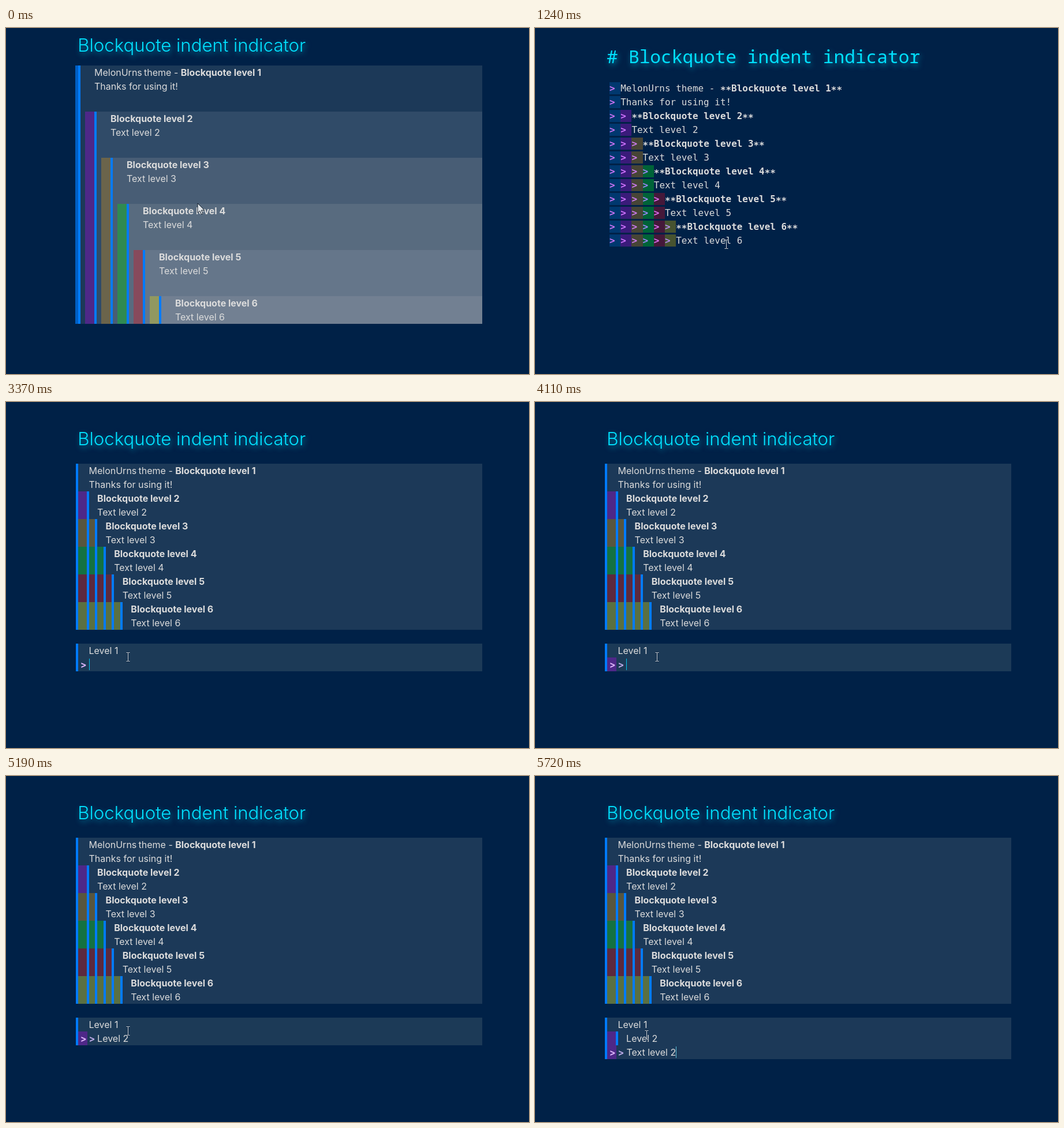
Recreate the animation shown at these times as an HTML page. Size 906x600 px, loop 6030 ms.

```html
<!DOCTYPE html>
<html lang="en">
<head>
<meta charset="utf-8">
<title>Blockquote indent indicator</title>
<style>
  html, body { margin: 0; width: 100%; height: 100%; overflow: hidden; background: #002147; }
  svg { display: block; width: 906px; height: 600px; }
  text { font: 400 16px Inter, sans-serif; fill: #dcdcdc; white-space: pre; font-optical-sizing: none; }
  .b { font-weight: 700; }
  .m { font-family: "DejaVu Sans Mono", monospace; font-size: 15.95px; }
  .h { font-size: 31.2px; font-weight: 300; fill: #00e1ff; text-shadow: 2px 4px 10px rgba(0, 225, 255, .5); }
  .hm { font-family: "Noto Sans Mono", monospace; }
  rect { shape-rendering: crispEdges; }
</style>
</head>
<body>
<svg id="stage" viewBox="0 0 906 600"></svg>
<script>
const stage = document.getElementById('stage');
const LOOP = 6030, BLUE = '#007bff', PANEL = '#1c3958', PURPLE = '#4e2888';
const THEME = 'MelonUrns', TITLE = 'Blockquote indent indicator', THANKS = 'Thanks for using it!';
const LEVELS = [1, 2, 3, 4, 5, 6];

const rect = (x, y, w, h, fill) =>
  `<rect x="${x}" y="${y}" width="${w}" height="${h}" fill="${fill}"/>`;
const text = (x, y, str, cls = '', extra = '') =>
  `<text x="${x}" y="${y}" class="${cls}" ${extra}>${str.replace(/>/g, '&gt;')}</text>`;
const caret = (x, y, fill = '#8fb4c8') => rect(x, y, 1, 20, fill);
const mark = (x, y, fill) => text(x, y, '>', 'b', `style="fill:${fill}"`);

function beam(x, y) {
  const d = 'M-3 -7.5h2.5l.5 .5l.5 -.5h2.5M0 -7V7M-3 7.5h2.5l.5 -.5l.5 .5h2.5';
  return `<g transform="translate(${x + .5} ${y})" fill="none">` +
    `<path d="${d}" stroke="#001530" stroke-width="2.4" opacity=".6"/>` +
    `<path d="${d}" stroke="#d5dbe0"/></g>`;
}

const arrow = (x, y) =>
  `<path transform="translate(${x} ${y})" d="M0 0V16.5L3.8 13L6.4 19L9 17.9L6.5 12H11.8Z"
    fill="#e2e6ea" stroke="#0b1826" stroke-linejoin="round"/>`;

// Two lines of text of one rendered quote level
function entry(n, x, y) {
  const head = n > 1 ? text(x, y, 'Blockquote level ' + n, 'b')
    : text(x, y, THEME) + text(x + 145.3, y, 'theme -', '', 'text-anchor="end"') +
      text(x + 149.7, y, 'Blockquote level 1', 'b');
  return head + text(x, y + 24, n > 1 ? 'Text level ' + n : THANKS);
}

function preview() {
  const tabs = ['#005fc4', PURPLE, '#6b644b', '#2f8a52', '#874a5c', '#919860'];
  const fills = [PANEL, '#304b68', '#485d75', '#586b7f', '#65768a', '#728092'];
  return text(124.3, 41, TITLE, 'h') + LEVELS.map((n, i) => {
    const x = 125 + 28 * i, y = 65 + 80 * i, h = 513 - y, w = i ? 16 : 5;
    return rect(x - w, y, w, h, tabs[i]) + rect(x, y, 4, h, BLUE) +
      rect(x + 4, y, 821 - x, h, fills[i]) + entry(n, x + 28, y + 18);
  }).join('') + arrow(332, 304);
}

function markdown() {
  const cells = ['#00386f', '#3a1b7a', '#474536', '#006338', '#45193a', '#475330'];
  const signs = ['#cf74f8', '#cf74ff', '#cf7cf0', '#9f86f8', '#dc70f0', '#b58af0'];
  const bold = s => `<tspan class="b"><tspan dy="2.5">**</tspan><tspan dy="-2.5">${s}</tspan><tspan dy="2.5">**</tspan></tspan>`;
  let out = text(124.5, 61, '# ' + TITLE, 'h hm');
  const line = (n, row, html) => {
    const y = 94 + 24 * row;
    for (let i = 0; i < n; i++) {
      const a = Math.round(129 + 19.2 * i), b = Math.round(129 + 19.2 * (i + 1));
      out += rect(a, y, b - a, 21, cells[i]) +
        text(129 + 19.2 * i, y + 16, '>', 'm b', `style="fill:${signs[i]}"`);
    }
    out += `<text class="m" x="${129 + 19.2 * n}" y="${y + 16}">${html}</text>`;
  };
  for (const n of LEVELS) {
    line(n, 2 * n - 2, (n > 1 ? '' : THEME + ' theme - ') + bold('Blockquote level ' + n));
    line(n, 2 * n - 1, n > 1 ? 'Text level ' + n : THANKS);
  }
  return out;
}

function live() {
  const fills = [, PURPLE, '#58563f', '#147242', '#5c293e', '#5a7042'];
  let out = text(124.3, 75, TITLE, 'h') + rect(121, 107, 704, 288, PANEL) + rect(121, 107, 4, 288, BLUE);
  const bar = i => Math.floor(125.45 + 14.56 * i);
  for (const n of LEVELS) {
    const y = 59 + 48 * n;
    if (n > 1) out += rect(125, y, bar(n - 1) - 125, 48, fills[n - 1]);
    for (let i = 1; i < n; i++) out += rect(bar(i), y, 4, 48, BLUE);
    out += entry(n, 143.5 + 14.56 * (n - 1), y + 18);
  }
  return out;
}

// The quote typed under the finished one
function typing(t) {
  const rows = t < 3370 ? 1 : t < 5520 ? 2 : 3;
  let out = rect(121, 419, 704, 24 * rows, rows === 2 ? '#1c3a57' : PANEL) +
    rect(121, 419, 4, 24 * rows, BLUE);
  if (rows === 1) {
    const typed = t < 2870 ? '' : t < 3090 ? 'Level ' : 'Level 1';
    out += mark(128.8, 437, '#dcb8f0') + text(143.5, 437, typed) +
      caret(t < 2870 ? 139 : t < 3090 ? 187 : 195, 421);
  } else {
    out += text(143.5, 437, 'Level 1');
    const y = 419 + 24 * (rows - 1);
    if (t >= 3570) out += rect(125, y, 16, 24, PURPLE) + mark(143.5, y + 18, '#b9a8e4');
    out += mark(128.8, y + 18, '#dcb4fa');
  }
  if (rows === 2) {
    const typed = t < 4810 ? '' : t < 5020 ? 'L' : t < 5100 ? 'Le' : t < 5190 ? 'Leve' : 'Level 2';
    out += text(158.1, 461, typed);
    const x = t < 3570 ? 144 : t < 4060 ? 154 : t < 4110 ? 0 : t < 4610 ? 158 :
      t < 4810 ? 0 : t < 5020 ? 167 : t < 5100 ? 176 : t < 5190 ? 194 : 0;
    if (x) out += caret(x, 445, '#00c4ee');
  }
  if (rows === 3) {
    const done = t >= 5720;
    out += rect(125, 443, 15, 24, PURPLE) + rect(140, 443, 4, 24, BLUE) + text(158.1, 461, 'Level 2') +
      text(158.4, 485, done ? 'Text level 2' : '') + caret(done ? 244 : 158, 469, '#5cc0d8');
  }
  return out + (t < 5720 ? beam(211, 442) : beam(193, 449));
}

function source(t) {
  const k = t < 1160 ? 0 : t < 1200 ? 1 / 3 : t < 1240 ? 2 / 3 : 1;
  return (k ? '' : caret(359, 358)) + beam(Math.round(372 - 41 * k), Math.round(370 + 5 * k));
}

const scenes = [preview(), markdown(), live()];
let shown = '';

function draw(t) {
  const html = t < 1130 ? scenes[0] : t < 2820 ? scenes[1] + source(t) : scenes[2] + typing(t);
  if (html !== shown) stage.innerHTML = shown = html;
}

const start = performance.now();
function tick() {
  draw((performance.now() - start) % LOOP);
  requestAnimationFrame(tick);
}
tick();
</script>
</body>
</html>
```
